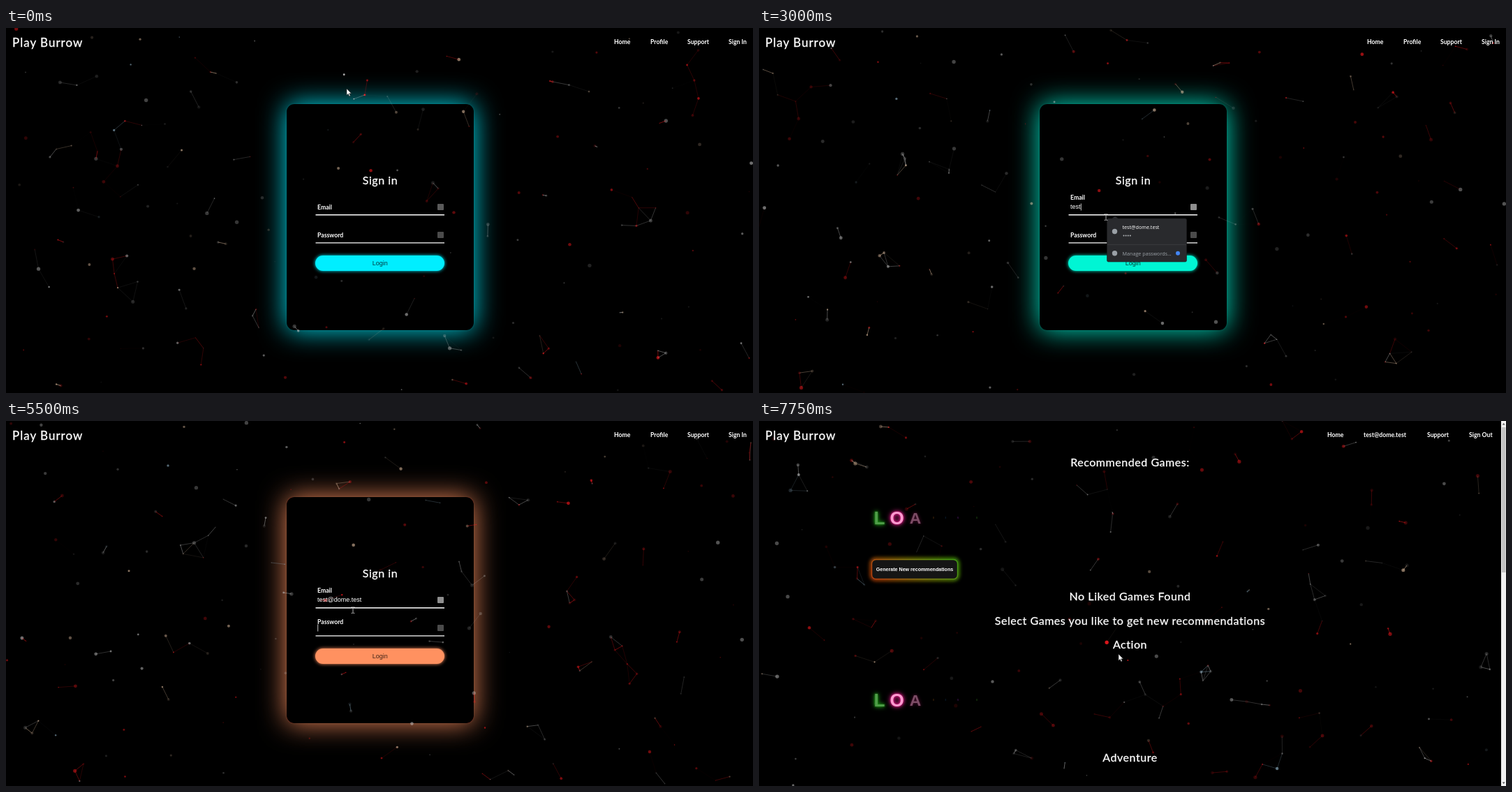
Animation, 1070 px wide and 523 px high, one loop 8000 ms. Source, as an HTML page with a canvas:

```html
<!DOCTYPE html>
<html lang="en">
<head>
<meta charset="utf-8">
<title>Sign in</title>
<style>
  html, body { margin: 0; width: 100%; height: 100%; overflow: hidden; background: #000; }
  #stage { position: relative; width: 1070px; height: 523px; overflow: hidden; background: #000; }
  #stage > * { position: absolute; left: 0; top: 0; }
  #stage #card {
    left: 402px; top: 109px; width: 268px; height: 324px; border-radius: 11px;
    background: #000; box-shadow: 0 0 3px rgba(0, 238, 255, .2), 0 0 38px rgba(0, 238, 255, .92);
  }
  #stage #login {
    left: 443px; top: 325.5px; width: 185px; height: 22.5px; border-radius: 12px;
    background: #00eeff; box-shadow: 0 0 5px #00eeff;
  }
  svg { display: block; }
  text { fill: #fff; white-space: pre; }
  .head { font: 16px Lato, sans-serif; letter-spacing: .55px; stroke: #fff; stroke-width: .3px; }
  .logo { font-size: 17px; letter-spacing: 1px; }
  .mid { text-anchor: middle; }
  .nav { font: bold 8.7px Lato, sans-serif; }
  .field { font: 9px "Liberation Sans", Arial, sans-serif; }
  .menu { font: 7.2px "Open Sans", sans-serif; }
  .neon { font: bold 26px "Liberation Sans", Arial, sans-serif; text-anchor: middle; }
  .gen { font: bold 7.1px "Liberation Sans", Arial, sans-serif; text-anchor: middle; }
</style>
</head>
<body>
<div id="stage">
  <div id="card"></div>
  <canvas id="dots" width="1070" height="523"></canvas>
  <div id="login"></div>
  <svg width="1070" height="523" viewBox="0 0 1070 523">
    <defs>
      <linearGradient id="rim" x1="0" y1=".6" x2="1" y2=".4">
        <stop offset="0" stop-color="#b8430c"/>
        <stop offset=".5" stop-color="#857a10"/>
        <stop offset="1" stop-color="#469a10"/>
      </linearGradient>
      <filter id="soft" x="-20%" y="-50%" width="140%" height="200%"><feGaussianBlur stdDeviation="2.4"/></filter>
    </defs>
    <text class="head logo" x="9" y="27">Play Burrow</text>

    <g id="signin">
      <text class="nav" x="871" y="23">Home</text>
      <text class="nav" x="923" y="23">Profile</text>
      <text class="nav" x="976" y="23">Support</text>
      <text class="nav" x="1035" y="23">Sign In</text>
      <text class="head mid" x="536" y="224">Sign in</text>
      <path d="M443.5 267.7H628M443.5 307.9H628" stroke="#fff" stroke-width="1.4"/>
      <text id="mailLabel" class="nav" x="446">Email</text>
      <text id="passLabel" class="nav" x="446">Password</text>
      <text id="mail" class="field" x="446" y="259"></text>
      <g id="pass" fill="#fff"></g>
      <rect id="caret" width=".9" height="10" fill="#ddd"/>
      <rect id="mailIcon" x="618" y="252" width="9" height="9" rx="1"/>
      <rect x="618" y="292" width="9" height="9" rx="1" fill="#4b4b4b"/>
      <text class="field mid" x="535.8" y="340" style="fill:rgba(0,0,0,.75)">Login</text>
      <g id="menu">
        <path d="M505 273.5l5-4 5 4z" fill="#292a2d"/>
        <rect x="498.5" y="273" width="114" height="62" rx="2" fill="#292a2d" stroke="#1c1d1f" stroke-width=".6"/>
        <circle cx="509.5" cy="291.5" r="3.7" fill="#9aa0a6"/>
        <text class="menu" x="520.5" y="288">test@dome.test</text>
        <g fill="#b5b8bc">
          <circle cx="522.5" cy="297.5" r="1"/><circle cx="525.6" cy="297.5" r="1"/>
          <circle cx="528.7" cy="297.5" r="1"/><circle cx="531.8" cy="297.5" r="1"/>
        </g>
        <path d="M499 310.3H612" stroke="#3f4043" stroke-width=".8"/>
        <circle cx="509.5" cy="322.8" r="3.7" fill="#9aa0a6"/>
        <text class="menu" x="520.5" y="325.6" style="fill:#9aa0a6">Manage passwords...</text>
        <circle cx="600" cy="322.8" r="3" fill="#4285f4"/>
      </g>
    </g>

    <g id="home">
      <text class="nav" x="814" y="23">Home</text>
      <text class="nav" x="866" y="23">test@dome.test</text>
      <text class="nav" x="957" y="23">Support</text>
      <text class="nav" x="1017" y="23">Sign Out</text>
      <text class="head mid" x="531.5" y="65">Recommended Games:</text>
      <text class="head mid" x="531.5" y="257">No Liked Games Found</text>
      <text class="head mid" x="531.5" y="292">Select Games you like to get new recommendations</text>
      <text class="head mid" x="531.5" y="326">Action</text>
      <text class="head mid" x="531.5" y="488">Adventure</text>
      <g id="loaders"></g>
      <rect x="161" y="198" width="124" height="29" rx="6" fill="none" stroke="url(#rim)" stroke-width="4.5" filter="url(#soft)"/>
      <rect x="161.5" y="198.5" width="123" height="28" rx="6" fill="#151515" stroke="url(#rim)" stroke-width="1.4"/>
      <text class="gen" x="223" y="215">Generate New recommendations</text>
      <rect x="1063" width="7" height="523" fill="#f1f1f1"/>
      <rect x="1064" y="9" width="5.5" height="208" fill="#c1c1c1"/>
      <path d="M1064.7 5.5l2-2.5 2 2.5zM1064.7 517.5l2 2.5 2-2.5z" fill="#505050"/>
    </g>

    <path id="arrow" d="M0 0V9.3L2.2 7.3 3.7 10.8 5.2 10.1 3.7 6.8H6.6Z" fill="#fff" stroke="#222" stroke-width=".5"/>
    <path id="beam" d="M-2.4-4.3H-.5L0-3.8.5-4.3H2.4M0-3.8V3.8M-2.4 4.3H-.5L0 3.8.5 4.3H2.4" fill="none" stroke="#c4c4c4" stroke-width=".9"/>
  </svg>
</div>
<script>
const W = 1070, H = 523, LOOP = 8, STEP = 0.25;
const MAIL = "test@dome.test";
const MAIL_FOCUS = 0.6, PASS_FOCUS = 5.3, SUBMIT = 7.2;
const MAIL_KEYS = [1.5, 1.65, 1.75, 1.9, 3.1, 3.6, 3.9, 4.1, 4.3, 4.5, 4.7, 4.85, 5, 5.1];
const PASS_KEYS = [5.9, 6.1, 6.3, 6.5];
const HUE = [[0, 0], [1, 340], [2, 700], [3.75, 1343], [5.5, 1988], [6.75, 2452], [8, 2912]];
const MOUSE_X = [[0, 488], [0.15, 488], [0.6, 495], [2, 495], [3, 497], [7.2, 497], [7.7, 515]];
const MOUSE_Y = [[0, 87], [0.15, 87], [0.6, 262], [1, 267], [2, 270], [3, 271], [7.2, 271], [7.7, 334]];

const $ = id => document.getElementById(id);
const clamp = v => Math.max(0, Math.min(1, v));
const easeOut = p => 1 - (1 - clamp(p)) ** 2;
const set = (id, attrs) => { for (const k in attrs) $(id).setAttribute(k, attrs[k]); };
const show = (id, on) => { $(id).style.display = on ? "" : "none"; };
const pressed = (keys, t) => keys.filter(k => k <= t).length;

// Piecewise linear value of [time, value] points
function track(points, t) {
  for (let i = 1; i < points.length; i++) {
    const [t0, a] = points[i - 1], [t1, b] = points[i];
    if (t < t1) return a + (b - a) * (t - t0) / (t1 - t0);
  }
  return points[points.length - 1][1];
}

function random(seed) {
  return () => {
    seed = (seed + 0x6D2B79F5) | 0;
    let r = Math.imul(seed ^ (seed >>> 15), 1 | seed);
    r = (r + Math.imul(r ^ (r >>> 7), 61 | r)) ^ r;
    return ((r ^ (r >>> 14)) >>> 0) / 4294967296;
  };
}

// Drifting, linked particles
const COLORS = ["255,25,30", "200,200,200", "255,215,180", "150,185,205"];
function field(seed, count = 195) {
  const rnd = random(seed);
  return Array.from({ length: count }, () => {
    const c = rnd();
    return {
      x: rnd() * W, y: rnd() * H,
      vx: (rnd() - 0.5) * 70, vy: (rnd() - 0.5) * 70,
      r: 0.6 + rnd() * 2.1, a: 0.1 + 0.5 * rnd() ** 1.8,
      color: COLORS[c < 0.4 ? 0 : c < 0.84 ? 1 : c < 0.96 ? 2 : 3]
    };
  });
}
const fields = [field(41), field(97)];
const ctx = $("dots").getContext("2d");
const wrap = (v, size) => ((v + 4) % (size + 8) + size + 8) % (size + 8) - 4;

function drawField(list, t, mx, my) {
  const REACH = 34;
  ctx.clearRect(0, 0, W, H);
  const pts = list.map(p => ({ ...p, x: wrap(p.x + p.vx * t, W), y: wrap(p.y + p.vy * t, H) }));
  ctx.lineWidth = 0.8;
  pts.forEach((p, i) => {
    for (let j = 0; j < i; j++) {
      const q = pts[j], d = Math.hypot(p.x - q.x, p.y - q.y);
      if (d > REACH) continue;
      ctx.strokeStyle = `rgba(${p.color},${0.8 * (1 - d / REACH)})`;
      ctx.beginPath();
      ctx.moveTo(p.x, p.y);
      ctx.lineTo(q.x, q.y);
      ctx.stroke();
    }
    const near = Math.hypot(p.x - mx, p.y - my) < 28;
    ctx.fillStyle = `rgba(${p.color},${near ? 0.85 : p.a})`;
    ctx.beginPath();
    ctx.arc(p.x, p.y, p.r, 0, 7);
    ctx.fill();
  });
}

// Neon loading words
const LETTERS = [
  ["L", 172.5, "#4f9d48", "#1f9a18"], ["O", 197.5, "#ff9ad0", "#e01a88"], ["A", 224, "#a8688a", "#4c1030"],
  ["D", 250, "#8a5a2a", "#7a3a00"], ["I", 267, "#3a6f9d", "#104a90"], ["N", 285, "#8a3a9d", "#601090"], ["G", 312, "#4a9d3a", "#206a10"]
];
$("loaders").innerHTML = [139, 400].map(y => LETTERS.map(([ch, x, fill, glow]) =>
  `<g class="letter" data-x="${x}" data-y="${y}"><text class="neon" y="9.3"
    style="fill:${fill};filter:drop-shadow(0 0 1.5px ${glow}) drop-shadow(0 0 3px ${glow})">${ch}</text></g>`).join("")).join("");
const letters = [...document.querySelectorAll(".letter")];

$("pass").innerHTML = PASS_KEYS.map((k, i) => `<circle cx="${448 + i * 3.2}" cy="296" r="1.5"/>`).join("");

function drawForm(t) {
  const onMail = t >= MAIL_FOCUS && t < PASS_FOCUS, onPass = t >= PASS_FOCUS;
  const typed = pressed(MAIL_KEYS, t), hidden = pressed(PASS_KEYS, t);
  set("mailLabel", { y: 260 - 14 * easeOut((t - MAIL_FOCUS) / 0.5) });
  set("passLabel", { y: 300 - 14 * easeOut((t - PASS_FOCUS) / 0.5) });
  $("mail").textContent = MAIL.slice(0, typed);
  [...$("pass").children].forEach((c, i) => { c.style.display = i < hidden ? "" : "none"; });
  set("mailIcon", { fill: t < MAIL_FOCUS ? "#5a5a5a" : "#8e8e8e" });
  show("menu", onMail);

  const keys = onPass ? PASS_KEYS : MAIL_KEYS, n = onPass ? hidden : typed;
  const last = n ? keys[n - 1] : onPass ? PASS_FOCUS : MAIL_FOCUS;
  show("caret", (onMail || onPass) && (t - last) % 1 < 0.5);
  const end = onPass ? n * 3.2 : n ? $("mail").getComputedTextLength() : 0;
  set("caret", { x: 446.3 + end, y: onPass ? 291.5 : 251.5 });

  const hue = `hue-rotate(${track(HUE, t) % 360}deg)`;
  $("card").style.filter = $("login").style.filter = hue;
}

function drawHome(t) {
  letters.forEach((g, i) => {
    const p = clamp((t - 7.09 - 0.22 * (i % LETTERS.length)) / 0.35);
    const scale = 0.1 + 0.9 * easeOut(p);
    g.setAttribute("transform", `translate(${g.dataset.x} ${g.dataset.y}) scale(${scale})`);
    g.setAttribute("opacity", 0.3 + 0.7 * p);
  });
}

function draw(t) {
  const home = t >= SUBMIT;
  for (const id of ["signin", "card", "login"]) show(id, !home);
  show("home", home);
  home ? drawHome(t) : drawForm(t);

  const x = track(MOUSE_X, t), y = track(MOUSE_Y, t);
  const beam = t >= MAIL_FOCUS && !home;
  show("beam", beam);
  show("arrow", !beam);
  set(beam ? "beam" : "arrow", { transform: `translate(${x} ${y})` });
  drawField(fields[+home], t, x, y);
}

let shown = -1;
function tick(now) {
  const step = Math.floor(now / 1000 % LOOP / STEP);
  if (step !== shown) draw((shown = step) * STEP);
  requestAnimationFrame(tick);
}
draw(0);
requestAnimationFrame(tick);
</script>
</body>
</html>
```
